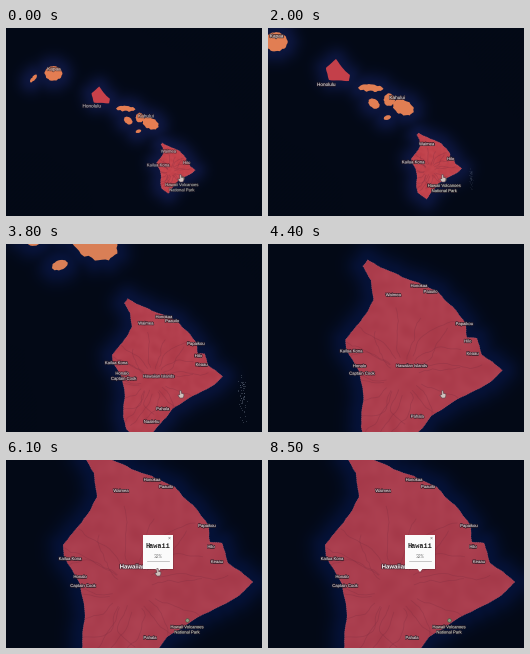
Write a matplotlib script that moves like this. It is 256 px wide and 188 px high and loops after 9.4 s.

```python
import numpy as np
import matplotlib.pyplot as plt
from matplotlib import patheffects
from matplotlib.animation import FuncAnimation
from matplotlib.patches import Polygon

W, H, FPS, FRAMES = 256, 188, 10, 94
PX = 0.72  # points per pixel at 100 dpi
FOCUS = np.array([174.5, 147.2])
FAR, MID, NEAR = 0.203, 0.266, 0.417
LEVELS = [-2.3, -1.933, -1.392, -0.78, 0.0]  # log2 of the scale
ZOOM_SPANS = [(9, 17), (19, 27), (28, 38), (38, 48)]
RED = np.array([(201, 65, 74), (171, 58, 75)]) / 255  # far, close
ORANGE = np.array([(228, 125, 82), (212, 128, 88)]) / 255


def to_world(points, scale):
    return FOCUS + (np.asarray(points, float) - FOCUS) / scale


def to_screen(points, scale):
    return FOCUS + (np.asarray(points, float) - FOCUS) * scale


def ease(n, start, end):
    p = np.clip((n - start) / (end - start), 0, 1)
    return p * p * (3 - 2 * p)


def zoom_at(n):
    steps = [ease(n, *span) for span in ZOOM_SPANS]
    return 2 ** (LEVELS[0] + np.dot(np.diff(LEVELS), steps))


def closeness(scale):
    return np.clip(1 - np.log(scale) / np.log(FAR), 0, 1)


def coast(points, rough=0.022, rounds=3):
    """Roughen an outline by midpoint displacement."""
    p = np.array(points, float)
    for _ in range(rounds):
        nxt = np.roll(p, -1, axis=0)
        normal = (nxt - p)[:, ::-1] * [1, -1]
        mid = (p + nxt) / 2 + normal * rng.normal(0, rough, (len(p), 1))
        p = np.stack([p, mid], 1).reshape(-1, 2)
    return p


def islet(x, y, rx, ry, tilt, scale=NEAR):
    """Rough ellipse given in screen pixels at the given scale."""
    a, t = np.linspace(0, 2 * np.pi, 10, endpoint=False), np.radians(tilt)
    u, v = rx * np.cos(a), ry * np.sin(a)
    outline = np.stack([x + u * np.cos(t) - v * np.sin(t),
                        y + u * np.sin(t) + v * np.cos(t)], 1)
    return coast(to_world(outline, scale), 0.07, 2)


rng = np.random.default_rng(8)
big_island = coast([
    (78, -4), (84, -12), (106, 0), (146, 16), (169, 27), (187, 45), (203, 66),
    (204, 82), (216, 83), (222, 103), (247, 122), (231, 137), (186, 161),
    (161, 177), (137, 206), (115, 237), (82, 213), (76, 190), (79, 156),
    (74, 124), (58, 96), (57, 85), (76, 62), (91, 37), (88, 13)])
oahu = coast(to_world([(58, 40), (68, 31), (73, 38), (82, 47), (81, 53), (61, 52)], MID))
islets = [islet(62, 11, 20, 6, 2), islet(67, 35, 10, 7, 35),     # Molokai, Lanai
          islet(91, 29, 9, 10, 0), islet(113, 41, 18, 12, 25),   # Maui
          islet(88, 57, 6, 3.5, -20),                            # Kahoolawe
          islet(47.5, 45.5, 9, 7.5, 0, FAR), islet(27.5, 50.5, 5, 2, -50, FAR)]
shore = np.vstack([big_island[::2], oahu[::3], *(s[::2] for s in islets)])
reef = rng.normal((279, 154), (4, 22), (60, 2))
relief = rng.random((34, 30))

# Gullies wander outward from the central summit
summit = np.array([128, 128])
gullies = []
for angle in np.linspace(0, 2 * np.pi, 22, endpoint=False):
    heading = angle + np.cumsum(rng.normal(0, 0.25, 16))
    steps = np.stack([np.cos(heading), np.sin(heading)], 1) * rng.uniform(3, 5)
    gullies.append(summit + 18 * steps[0] / 4 + np.cumsum(steps, axis=0))

grid_y, grid_x = np.mgrid[0:H:4, 0:W:4]
grid = np.stack([grid_x, grid_y], -1) + 2.0

MAIN_TOWNS = {"Waimea": (115, 31), "Hilo": (205, 87), "Kailua Kona": (64, 99)}
VILLAGES = {"Captain Cook": (77, 126), "Pahala": (144, 178), "Naalehu": (125, 200),
            "Honokaa": (146, 20), "Paauilo": (160, 27), "Papaikou": (201, 66),
            "Keaau": (211, 102), "Honalo": (74, 117)}
FAR_TOWNS = {"Honolulu": (86, 78), "Kapaa": (48, 41), "Kahului": (140, 88)}

fig = plt.figure(figsize=(W / 100, H / 100), dpi=100)
ax = fig.add_axes([0, 0, 1, 1])


def write(x, y, text, size=4.2, color="#e9e6e4", alpha=1.0, halo=True, **font):
    if not (-15 < x < W + 15 and -5 < y < H + 5):
        return
    t = ax.text(x, y, text, fontsize=size * PX, color=color, alpha=alpha, ha="center",
                va="center", clip_on=True,
                **{"family": "Liberation Sans", "zorder": 5, **font})
    if halo:
        t.set_path_effects([patheffects.withStroke(
            linewidth=1.1, foreground="#251a24", alpha=0.7 * alpha)])


def draw_ocean(scale):
    near = closeness(scale)
    d2 = ((grid[:, :, None] - to_screen(shore, scale)) ** 2).sum(-1).min(-1)
    glow = np.exp(-d2 / (11 + 4 * near) ** 2)[..., None]
    sea = np.array([3, 9, 22]) + glow * np.array([11 - 9 * near, 14 - 5 * near, 42 - 8 * near])
    ax.imshow(sea / 255, extent=(0, W, H, 0), interpolation="bicubic", aspect="auto")


def draw_land(scale):
    near = closeness(scale)
    red, orange = (c[0] + (c[1] - c[0]) * near for c in (RED, ORANGE))
    for shape in islets:
        ax.add_patch(Polygon(to_screen(shape, scale), fc=orange, ec="none", zorder=2))
    ax.add_patch(Polygon(to_screen(oahu, scale), fc=red, ec="none", zorder=2))
    island = ax.add_patch(Polygon(to_screen(big_island, scale), fc=red, zorder=2,
                                  ec=(0.72, 0.55, 0.68, 0.45), lw=0.5, ls=":"))
    (x0, y0), (x1, y1) = to_screen([(50, -15), (250, 240)], scale)
    shade = ax.imshow(relief, extent=(x0, x1, y1, y0), cmap="gray", alpha=0.05,
                      interpolation="bicubic", aspect="auto", zorder=3)
    shade.set_clip_path(island)
    for gully in gullies:
        line, = ax.plot(*to_screen(gully, scale).T, color="#7c2c40", lw=0.5,
                        alpha=0.35, zorder=3)
        line.set_clip_path(island)
    ax.scatter(*to_screen(reef, scale).T, s=0.3, color="#8592a4", alpha=0.6 * near, lw=0)


def draw_labels(n, scale):
    alpha = 0.75 + 0.25 * ease(n, 0, 5) - 0.4 * (ease(n, 45, 48) - ease(n, 48, 51))
    for name, pos in FAR_TOWNS.items():
        write(*to_screen(to_world(pos, FAR), scale), name, 4.7, alpha=alpha)
    towns = MAIN_TOWNS | (VILLAGES if scale > 0.5 else {})
    for name, pos in towns.items():
        write(*to_screen(pos, scale), name, alpha=alpha)
    if scale < 0.5 or scale > 0.9:
        x, y = to_screen((181, 160), scale)
        ax.plot(x, y, "o", ms=2.6, mfc="#8a9a80", mec="#46543f", mew=0.4, zorder=5)
        for line, text in enumerate(["Hawaii Volcanoes", "National Park"]):
            write(x, y + 7.3 + 5.2 * line, text, color="#dfe6d6", alpha=alpha)
    grown = ease(n, 46, 50)
    if scale > 0.38:
        x, y = to_screen((137, 122 - 9 * ease(n, 39, 48)), scale)
        write(x, y, "Hawaiian Islands", 4.1, alpha=1 - grown)
        write(137.5, 107, "Hawaiian Islands", 6, "#f4f0f0", grown, weight="bold")


def draw_popup():
    left, right, top, bottom, tip = 137, 167, 75, 109, 152
    box = np.array([(left, top), (right, top), (right, bottom), (tip + 2.5, bottom),
                    (tip, bottom + 3), (tip - 2.5, bottom), (left, bottom)])
    ax.add_patch(Polygon(box + 0.5, fc="#30141c", ec="none", alpha=0.35, zorder=6))
    ax.add_patch(Polygon(box, fc="#fbfbfb", ec="none", zorder=6))
    mono = dict(halo=False, family="Liberation Mono", zorder=7)
    write(tip, top + 12, "Hawaii", 6.9, "#222222", weight="bold", **mono)
    write(tip, top + 22, "32%", 4.8, "#777777", **mono)
    write(right - 4, top + 3.5, "×", 5, "#666666", **mono)
    ax.plot([left + 4, right - 4], [top + 26] * 2, color="#b0b0b0", lw=0.5, zorder=7)


def draw_cursor(n):
    pos = (np.array([175, 150]) + np.array([-11, -16]) * ease(n, 47, 51)
           + np.array([-12, -22]) * ease(n, 53, 57) + np.array([24, 90]) * ease(n, 70, 75))
    hand = np.array([(-1, -3), (0, -3), (0.5, -0.5), (2.5, 0), (2.5, 2), (1.5, 3.5),
                     (-1, 3.5), (-2.8, 1), (-1, 0.6)])
    ax.add_patch(Polygon(pos + 1.15 * hand, fc="#cfc2be", ec="#5a4048", lw=0.4, zorder=8))


def draw(n):
    ax.clear()
    ax.axis("off")
    scale = zoom_at(n)
    draw_ocean(scale)
    draw_land(scale)
    draw_labels(n, scale)
    if n >= 61:
        draw_popup()
    draw_cursor(n)
    ax.set(xlim=(0, W), ylim=(H, 0))
    return []


anim = FuncAnimation(fig, draw, frames=FRAMES, interval=1000 / FPS,
                     init_func=lambda: [], repeat=True, repeat_delay=0)
plt.show()
```
